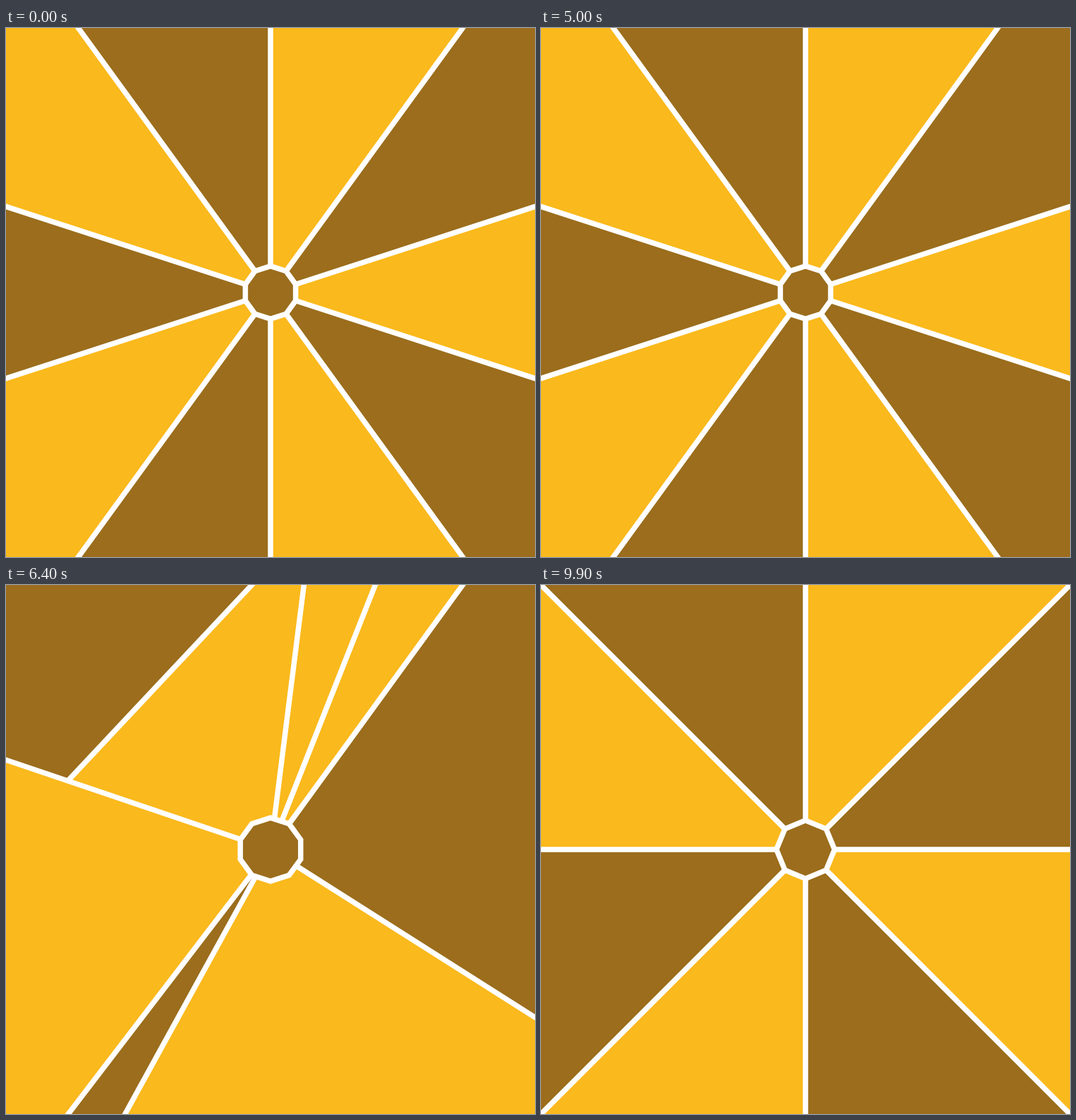
An HTML page with a canvas that plays this animation: 748x748 px, repeating every 10000 ms.

```html
<!DOCTYPE html>
<html lang="en">
<head>
<meta charset="utf-8">
<title>Pulsing wheel</title>
<style>
  html, body { margin: 0; width: 100%; height: 100%; overflow: hidden; background: #9b6d1c; }
  canvas { display: block; width: 748px; height: 748px; }
</style>
</head>
<body>
<canvas id="stage" width="748" height="748"></canvas>
<script>
const SIZE = 748, MID = SIZE / 2;
const LOOP = 10000, STEP = 100;
const FIRST = 10, SPIN = 50, SETTLE = 70;
const YELLOW = '#fab91c', BROWN = '#9b6d1c';
const ctx = document.getElementById('stage').getContext('2d');

// Angles run clockwise from the top, in degrees.
function point(angle, radius) {
  const a = angle * Math.PI / 180;
  return [MID + radius * Math.sin(a), MID - radius * Math.cos(a)];
}

function shape(points, fill) {
  ctx.beginPath();
  points.forEach(p => ctx.lineTo(...p));
  ctx.closePath();
  ctx.fillStyle = fill;
  ctx.fill();
  ctx.stroke();
}

function wedge(from, to) {
  // A blade opened past a half turn folds into a line.
  if (to - from > 180) to = from;
  shape([[MID, MID], point(from, SIZE), point(to, SIZE)], YELLOW);
}

function hub(sides, radius) {
  const corners = Array.from({ length: sides }, (_, i) => point(i * 360 / sides, radius));
  shape(corners, BROWN);
}

function lerp(a, b, p) {
  return a + (b - a) * p;
}

// How far the last blade has swung back.
function swing(n) {
  if (n < 8) return lerp(0, 54.75, n / 8);
  if (n < 14) return lerp(54.75, 35.3, (n - 8) / 6);
  return lerp(35.3, 9, (n - 14) / 6);
}

function hubRadius(step) {
  const grow = step < 30 ? 0.1 : 0.2;
  const beat = (1 - Math.cos((step - FIRST) * Math.PI / 2)) / 2;
  return SIZE * 0.05 * (1 + grow * beat);
}

function draw(step) {
  ctx.fillStyle = BROWN;
  ctx.fillRect(0, 0, SIZE, SIZE);
  ctx.strokeStyle = '#fff';
  ctx.lineWidth = SIZE / 100;

  const blades = step < SETTLE ? 5 : 4;
  const gap = 360 / blades;
  const n = step < SETTLE ? Math.max(0, step - SPIN) : 0;
  ctx.lineJoin = 'bevel';
  for (let i = 0; i < blades; i++) {
    const from = i * gap, to = from + gap / 2;
    if (i === 4) wedge(from - 2 * swing(n), to - swing(n));
    else wedge(from + 3.6 * i * n, to + 7.2 * i * n);
  }
  ctx.lineJoin = 'miter';
  hub(blades * 2, hubRadius(step));
}

const start = performance.now();
function tick() {
  const t = (performance.now() - start) % LOOP;
  draw(Math.max(FIRST, Math.floor(t / STEP)));
  requestAnimationFrame(tick);
}
tick();
</script>
</body>
</html>
```
